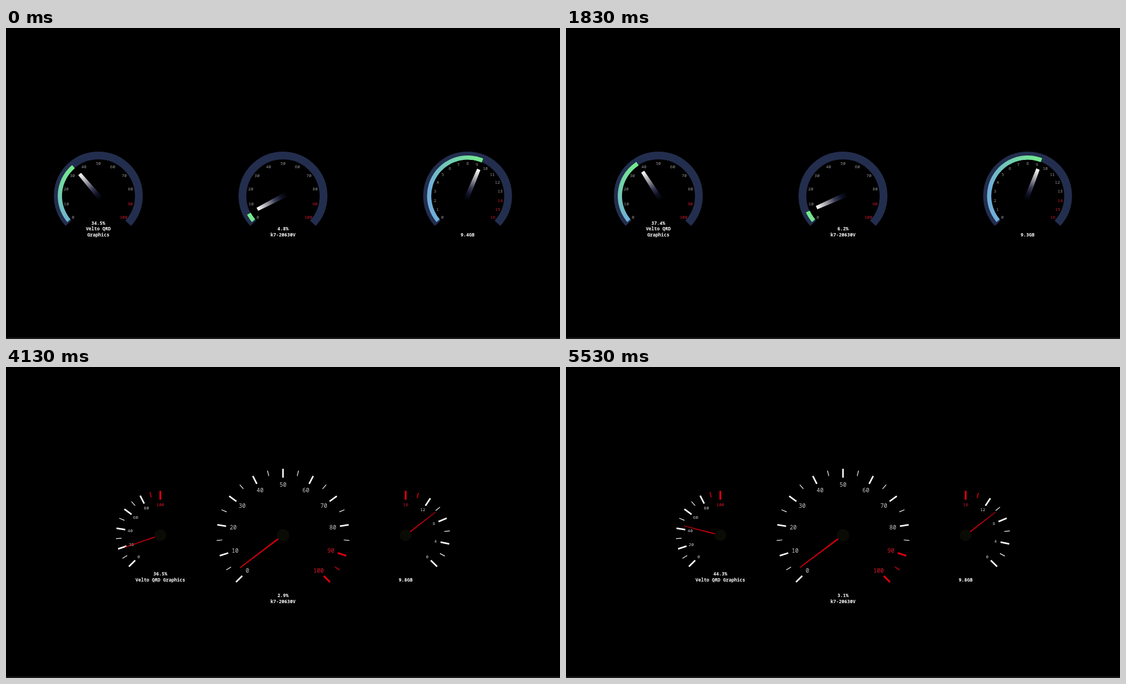
Animation of 998x561 px, one loop 6 s. Source, as an HTML page:

```html
<!DOCTYPE html>
<html lang="en">
<head>
<meta charset="utf-8">
<title>System gauges</title>
<style>
  html, body { margin: 0; width: 100%; height: 100%; overflow: hidden; background: #000; }
  svg { display: block; width: 100vw; height: 100vh; }
  text { font-family: "Noto Sans Mono", "DejaVu Sans Mono", monospace; text-anchor: middle; }
  .caption { font-size: 8.3px; font-weight: 700; fill: #fff; }
</style>
</head>
<body>
<svg id="stage" viewBox="0 0 998 561">
  <defs>
    <linearGradient id="needle" gradientUnits="userSpaceOnUse" x1="0" y1="-52" x2="0" y2="8">
      <stop offset="0" stop-color="#fff"/>
      <stop offset=".35" stop-color="#94949c"/>
      <stop offset=".6" stop-color="#353850"/>
      <stop offset=".8" stop-color="#0f1226"/>
      <stop offset="1" stop-color="#000"/>
    </linearGradient>
  </defs>
  <rect width="998" height="561"/>
  <rect y="559" width="998" height="1" fill="#3b3b38"/>
</svg>
<script>
const LOOP = 6000, CUT = 3070, EASE_MS = 480;
const RING_Y = 303, DIAL_Y = 303.4;
const GPU = "Velto QRD Graphics", CPU = "k7-20630V";
const stage = document.getElementById("stage");

function add(parent, tag, attrs = {}, content = "") {
  const node = document.createElementNS("http://www.w3.org/2000/svg", tag);
  for (const key in attrs) node.setAttribute(key, attrs[key]);
  node.textContent = content;
  parent.append(node);
  return node;
}

// Angles are in degrees clockwise from twelve o'clock.
function polar(radius, angle) {
  const a = angle * Math.PI / 180;
  return [radius * Math.sin(a), -radius * Math.cos(a)];
}

function arc(radius, from, to) {
  const point = angle => polar(radius, angle).map(v => v.toFixed(2)).join(" ");
  return `M${point(from)}A${radius} ${radius} 0 ${to - from > 180 ? 1 : 0} 1 ${point(to)}`;
}

function label(parent, radius, angle, value, size, fill) {
  const [x, y] = polar(radius, angle);
  add(parent, "text", { x, y, dy: ".36em", "font-size": size, fill }, value);
}

function captions(parent, lines, bottom) {
  return lines.map((line, i) => add(parent, "text", {
    class: "caption", y: bottom - (lines.length - 1 - i) * 10.8, dy: ".36em"
  }, line))[0];
}

const mix = (a, b, k) => `rgb(${a.map((v, i) => Math.round(v + (b[i] - v) * k))})`;

function ringGauge(scene, { x, max, step, redFrom, lines }) {
  const SPAN = 130, REACH = 96, SLICE = 4;
  const GREEN = [116, 234, 140], BLUE = [112, 174, 218];
  const angleOf = value => -SPAN + value / max * 2 * SPAN;
  const g = add(scene, "g", { transform: `translate(${x} ${RING_Y})` });
  add(g, "path", { d: arc(73, -132.5, 132.5), fill: "none", stroke: "#232e4e", "stroke-width": 14 });

  const slices = [];
  for (let behind = REACH; behind >= 0; behind -= SLICE) {
    const stroke = mix(GREEN, BLUE, behind / REACH);
    slices.push({ behind, path: add(g, "path", { fill: "none", stroke, "stroke-width": 7.6 }) });
  }
  for (let v = 0; v <= max; v += step)
    label(g, 59.3, angleOf(v), v, 7.8, v >= redFrom ? "#cc1830" : "#949494");
  const needle = add(g, "path", { d: "M-3.2-52H3.2L4.6 8H-4.6Z", fill: "url(#needle)" });
  const readout = captions(g, lines, 70.3);

  return (value, text) => {
    const end = angleOf(value);
    for (const { behind, path } of slices) {
      const from = behind === REACH ? -SPAN : Math.max(-SPAN, end - behind - SLICE);
      const to = Math.min(end, end - behind + .5);
      path.setAttribute("d", to > from ? arc(69.2, from, to) : "");
    }
    needle.setAttribute("transform", `rotate(${end})`);
    readout.textContent = text;
  };
}

function dialGauge(scene, { x, radius, from, to, max, step, redFrom, redLabel, size, lines, bottom }) {
  const angleOf = value => from + value / max * (to - from);
  const big = radius > 100;
  const g = add(scene, "g", { transform: `translate(${x} ${DIAL_Y})` });
  for (let v = 0; v <= max; v += step / 2) {
    const major = v % step === 0, red = v >= redFrom;
    add(g, "path", {
      d: `M0 ${-radius}V${-radius + (major ? 16 : 10)}`,
      transform: `rotate(${angleOf(v)})`,
      stroke: red ? (major ? "#e0000f" : "#b8000c") : "#fff",
      "stroke-width": major ? (red ? 3.2 : 2.8) : (red ? 2 : 1.2)
    });
    if (major) label(g, radius - (big ? 29 : 25), angleOf(v), v, size, v >= redLabel ? "#e0182c" : "#c8c8c8");
  }
  const w = big ? 1.5 : 1, tip = big ? 97 : 68;
  const needle = add(g, "path", { d: `M${-w} 0L${-w * .6} ${-tip}H${w * .6}L${w} 0Z`, fill: "#d0000c" });
  add(g, "circle", { r: big ? 11 : 10.5, fill: "#0b0b06" });
  const readout = captions(g, lines, bottom);

  return (value, text) => {
    needle.setAttribute("transform", `rotate(${angleOf(value)})`);
    readout.textContent = text;
  };
}

const ringScene = add(stage, "g"), dialScene = add(stage, "g");
const percent = { max: 100, step: 10, redFrom: 90 };
const gpuWords = GPU.split(" ");

// A reading shows its values as text; needles may settle at slightly different ones.
const reading = (at, values, needles = values) => ({ at, values, needles });

const scenes = [
  {
    node: ringScene,
    gauges: [
      ringGauge(ringScene, { ...percent, x: 166.3, lines: ["", gpuWords.slice(0, 2).join(" "), gpuWords[2]] }),
      ringGauge(ringScene, { ...percent, x: 499, lines: ["", CPU] }),
      ringGauge(ringScene, { x: 831.5, max: 16, step: 1, redFrom: 14, lines: [""] })
    ],
    readings: [
      reading(-EASE_MS, [34.5, 4.8, 9.4]),
      reading(760, [37.4, 6.2, 9.3])
    ]
  },
  {
    node: dialScene,
    gauges: [
      dialGauge(dialScene, { x: 278, radius: 80, from: -135, to: 0, max: 100, step: 20, redFrom: 90,
        redLabel: 100, size: 7.8, lines: ["", GPU], bottom: 80.6 }),
      dialGauge(dialScene, { ...percent, x: 499, radius: 119.8, from: -135, to: 135,
        redLabel: 90, size: 10.4, lines: ["", CPU], bottom: 119.6 }),
      dialGauge(dialScene, { x: 720, radius: 80, from: 135, to: 0, max: 16, step: 4, redFrom: 14,
        redLabel: 16, size: 7.8, lines: [""], bottom: 80.6 })
    ],
    readings: [
      reading(CUT - EASE_MS, [10.7, 3.1, 9.8]),
      reading(4025, [36.5, 2.9, 9.8], [36, 2.5, 9.8]),
      reading(5070, [44.3, 3.1, 9.8], [44, 3, 9.8])
    ]
  }
];
const units = ["%", "%", "GB"];

// cubic-bezier(.25, .1, .25, 1)
function ease(x) {
  if (x <= 0 || x >= 1) return x <= 0 ? 0 : 1;
  const bezier = (a, b, s) => 3 * a * s * (1 - s) ** 2 + 3 * b * s * s * (1 - s) + s ** 3;
  let low = 0, high = 1;
  for (let i = 0; i < 20; i++) {
    const mid = (low + high) / 2;
    if (bezier(.25, .25, mid) < x) low = mid; else high = mid;
  }
  return bezier(.1, 1, low);
}

function render(t) {
  const active = scenes[t < CUT ? 0 : 1];
  for (const scene of scenes) scene.node.setAttribute("display", scene === active ? "inline" : "none");
  const { gauges, readings } = active;
  const index = readings.findLastIndex(r => r.at <= t);
  const now = readings[index], before = readings[Math.max(0, index - 1)];
  const k = ease((t - now.at) / EASE_MS);
  gauges.forEach((update, i) => {
    const value = before.needles[i] + (now.needles[i] - before.needles[i]) * k;
    update(value, now.values[i].toFixed(1) + units[i]);
  });
}

const start = performance.now();
function frame() {
  render((performance.now() - start) % LOOP);
  requestAnimationFrame(frame);
}
frame();
</script>
</body>
</html>
```
